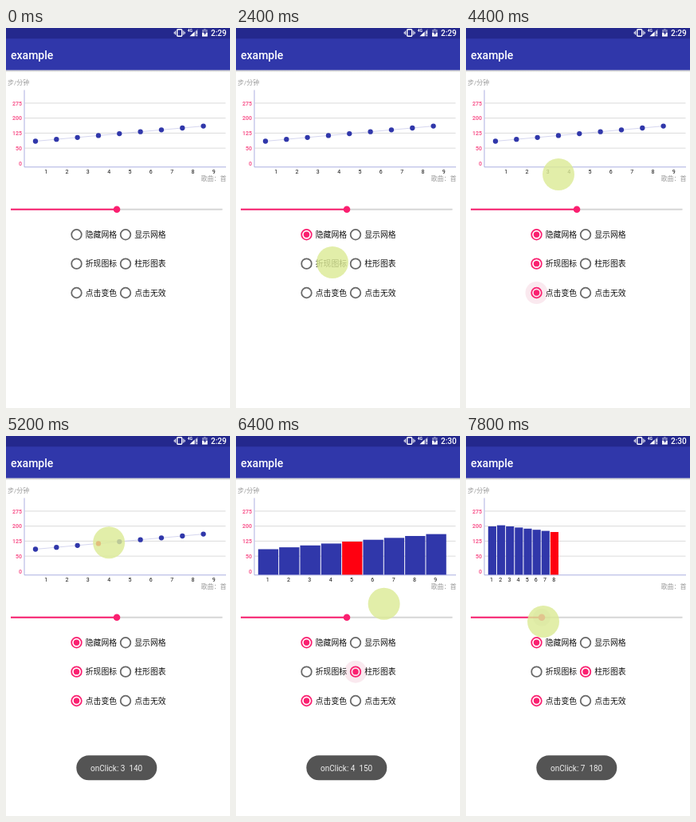
Recreate the animation shown at these times as an HTML page. Size 281 px wide and 475 px high, loop 8000 ms.

```html
<!DOCTYPE html>
<html lang="zh">
<head>
<meta charset="utf-8">
<style>
  html, body { margin: 0; width: 100%; height: 100%; overflow: hidden; background: #fff; }
  svg { display: block; width: 100vw; height: 100vh; }
  text { font-family: Roboto, "Noto Sans CJK SC", "Noto Sans CJK", sans-serif; white-space: pre; }
  .unit { font-size: 8px; fill: #999; }
  .scale { font: bold 7px Roboto, sans-serif; fill: #f8598f; text-anchor: end; }
  .tick { font-size: 7px; fill: #111; text-anchor: middle; }
  .option { font-size: 9.8px; fill: #111; }
</style>
</head>
<body>
<svg viewBox="0 0 281 475">
  <defs>
    <linearGradient id="shade" x2="0" y2="1">
      <stop offset="0" stop-color="#777" stop-opacity=".45"/>
      <stop offset="1" stop-color="#777" stop-opacity="0"/>
    </linearGradient>
  </defs>
  <rect width="281" height="475" fill="#fff"/>
  <rect y="52.5" width="281" height="3" fill="url(#shade)"/>
  <rect width="281" height="52.6" fill="#3037aa"/>
  <rect width="281" height="13.3" fill="#24288d"/>
  <text x="6" y="38.8" font-size="14" font-weight="500" fill="#fff">example</text>

  <g fill="#fff">
    <rect x="214.7" y="1.7" width="6" height="8.6" rx="1" fill="none" stroke="#fff" stroke-width="1.4"/>
    <path d="M212.6 3.5v5M222.8 3.5v5M211.2 4.8v2.5M224.2 4.8v2.5" stroke="#fff"/>
    <text x="227.7" y="5.2" font-size="5" font-weight="700">4G</text>
    <path d="M230.5 10.3L240.5 1v9.3z" opacity=".35"/>
    <path d="M230.5 10.3L236.5 4.7v5.6z"/>
    <path d="M239.3 3.5v4M239.3 8.7v1.6" stroke="#fff" stroke-width="1.2"/>
    <path d="M246 2h2V1h2.7v1h2v8.5H246z" opacity=".4"/>
    <path d="M246 6h6.7v4.5H246z"/>
    <path d="M249.8 3L247.6 6.6h1.5v2.6l2.2-3.7h-1.5z" fill="#24288d"/>
    <text id="clock" x="257" y="9.5" font-size="10" font-weight="500"></text>
  </g>

  <text class="unit" x="2" y="70.8">步/分钟</text>
  <text class="unit" x="244.5" y="190.6">歌曲：首</text>
  <g id="scale"></g>
  <g id="grid" stroke="#d2d2d2" stroke-width=".8"></g>
  <path d="M23 77.5V173.8H276" fill="none" stroke="#a3a6de" stroke-width=".9"/>
  <g id="chart"></g>
  <g id="slider"></g>
  <g id="radios"></g>
  <g id="toast">
    <rect x="88.3" y="399.3" width="101" height="31" rx="15.5" fill="#545454"/>
    <text id="message" x="106" y="418.8" font-size="10" fill="#eee"></text>
  </g>
  <circle id="touch" r="20" fill="#dceb96" fill-opacity=".81"/>
</svg>
<script>
const LOOP = 8000, STEP = 200;
const BLUE = '#3037aa', PINK = '#fa2070', RED = '#ff0010';
const PITCH = 26.33, LEFT = 23.8, BASE = 173.4;
const DRAG = 7000;
const ROWS = [['隐藏网格', '显示网格'], ['折现图标', '柱形图表'], ['点击变色', '点击无效']];

const $ = id => document.getElementById(id);
const range = n => [...Array(n).keys()];
const clamp = p => Math.min(1, Math.max(0, p));
const mix = (a, b, p) => a + (b - a) * p;
const easeOut = p => 1 - (1 - p) ** 2;

const radioX = col => 88.5 + 61.5 * col;
const radioY = row => 258.3 + 36.35 * row;
const pointX = (i, pitch = PITCH) => LEFT + pitch * (i + .5);
const pointY = i => 141.5 - 2.36 * i;
const barY = i => 111.6 + 1.4 * Math.abs(i - 1);

// The user's actions drive every change of state
const tapRadio = (at, row, col) => ({ at, row, col, x: radioX(col), y: radioY(row) });
const tapItem = (at, item) => ({ at, item, x: pointX(item), y: pointY(item) });
const move = (at, x, y) => ({ at, x, y });
const gestures = [
  move(200, 172, 200), tapRadio(1000, 0, 1),
  tapRadio(1800, 0, 0), move(2400, 121, 293),
  tapRadio(3000, 1, 0), tapRadio(4000, 2, 0), move(4400, 116, 183),
  tapItem(4800, 3), tapItem(5600, 4), move(6000, 155, 292),
  tapRadio(6200, 1, 1), tapItem(6600, 7),
  move(DRAG, 157, 226), move(7800, 97, 232)
];
const radioTaps = gestures.filter(g => 'row' in g);
const itemTaps = gestures.filter(g => 'item' in g);

const lastBefore = (list, t) => list.filter(g => g.at <= t).pop();
const picked = (row, t) => lastBefore(radioTaps.filter(g => g.row === row), t)?.col;
const dragged = t => clamp((t - DRAG) / 800) ** 2;

function touchAt(t) {
  const a = lastBefore(gestures, t);
  if (!a) return null;
  const b = gestures.find(g => g.at > t) || a;
  const p = clamp((t - a.at) / (b.at - a.at || 1));
  return [mix(a.x, b.x, p), mix(a.y, b.y, p)];
}

const circle = (x, y, r, fill, extra = '') =>
  `<circle cx="${x}" cy="${y}" r="${r}" fill="${fill}" ${extra}/>`;
const label = (cls, x, y, s) => `<text class="${cls}" x="${x}" y="${y}">${s}</text>`;

function lineChart(pitch, hit) {
  const points = range(9).map(i => [pointX(i, pitch), pointY(i)]);
  return `<polyline points="${points.join(' ')}" fill="none" stroke="#c3c5e8" stroke-width=".7"/>` +
    points.map(([x, y], i) => circle(x, y, 3.15, i === hit ? RED : BLUE) +
      label('tick', x + pitch / 2, 182.3, i + 1)).join('');
}

function barChart(count, top, pitch, hit) {
  const width = pitch - 1;
  return range(count).map(i => {
    const x = LEFT + 4 + pitch * i, y = top(i);
    return `<rect x="${x}" y="${y}" width="${width}" height="${BASE - y}" fill="${i === hit ? RED : BLUE}"/>` +
      label('tick', x + width / 2 - .8, 182.3, i + 1);
  }).join('');
}

function chart(t) {
  const hit = lastBefore(itemTaps, t)?.item;
  const restart = picked(1, t) === 0 ? 3000 : DRAG;
  if (t === restart) return '';
  if (t > DRAG) return barChart(8, barY, mix(PITCH, 11.15, dragged(t)), hit);
  if (picked(1, t) === 1) return barChart(9, pointY, PITCH, hit);
  const grown = t < 3000 ? 1 : easeOut(clamp((t - 3000) / 600));
  return lineChart(PITCH * grown, hit);
}

function slider(t) {
  const x = mix(139, 95, dragged(t));
  const track = (end, color) => `<path d="M6 226.8H${end}" stroke="${color}" stroke-width="1.9"/>`;
  return track(271.5, '#d6d6d6') + track(x, PINK) +
    (t >= DRAG ? circle(x, 226.8, 11, '#000', 'opacity=".07"') : '') +
    circle(x, 226.8, 4.3, PINK);
}

function radio(x, y, on, text) {
  return circle(x, y, 6.3, 'none', `stroke="${on ? PINK : '#686868'}" stroke-width="1.75"`) +
    (on ? circle(x, y, 3.7, PINK) : '') + label('option', x + 11.3, y + 3.7, text);
}

function radios(t) {
  const glow = radioTaps.filter(g => t >= g.at - 200 && t < g.at + 500)
    .map(g => circle(g.x, g.y, 14, '#fae9ef'));
  const buttons = ROWS.flatMap((texts, row) => texts.map((text, col) =>
    radio(radioX(col), radioY(row), picked(row, t) === col, text)));
  return [...glow, ...buttons].join('');
}

// Toasts queue up and follow one another at a fixed interval
function toastText(t) {
  const tap = itemTaps[Math.floor((t - 5200) / 1200)];
  return tap ? `onClick: ${tap.item}  ${110 + 10 * tap.item}` : '';
}

function draw(t) {
  $('clock').textContent = t < 5400 ? '2:29' : '2:30';
  $('grid').style.display = picked(0, t) === 1 ? 'none' : '';
  $('chart').innerHTML = chart(t);
  $('slider').innerHTML = slider(t);
  $('radios').innerHTML = radios(t);
  $('message').textContent = toastText(t);
  $('toast').style.display = toastText(t) ? '' : 'none';
  const spot = touchAt(t);
  $('touch').style.display = spot ? '' : 'none';
  if (spot) $('touch').setAttribute('transform', `translate(${spot})`);
}

$('scale').innerHTML = [275, 200, 125, 50, 0]
  .map((v, i) => label('scale', 20, 96.6 + 18.75 * i, v)).join('');
$('grid').innerHTML = range(4).map(i => `<path d="M23.5 ${93.9 + 18.75 * i}H275.5"/>`).join('');

let shown = -1;
const start = performance.now();
function tick() {
  const t = Math.floor((performance.now() - start) % LOOP / STEP) * STEP;
  if (t !== shown) draw(shown = t);
  requestAnimationFrame(tick);
}
tick();
</script>
</body>
</html>
```
